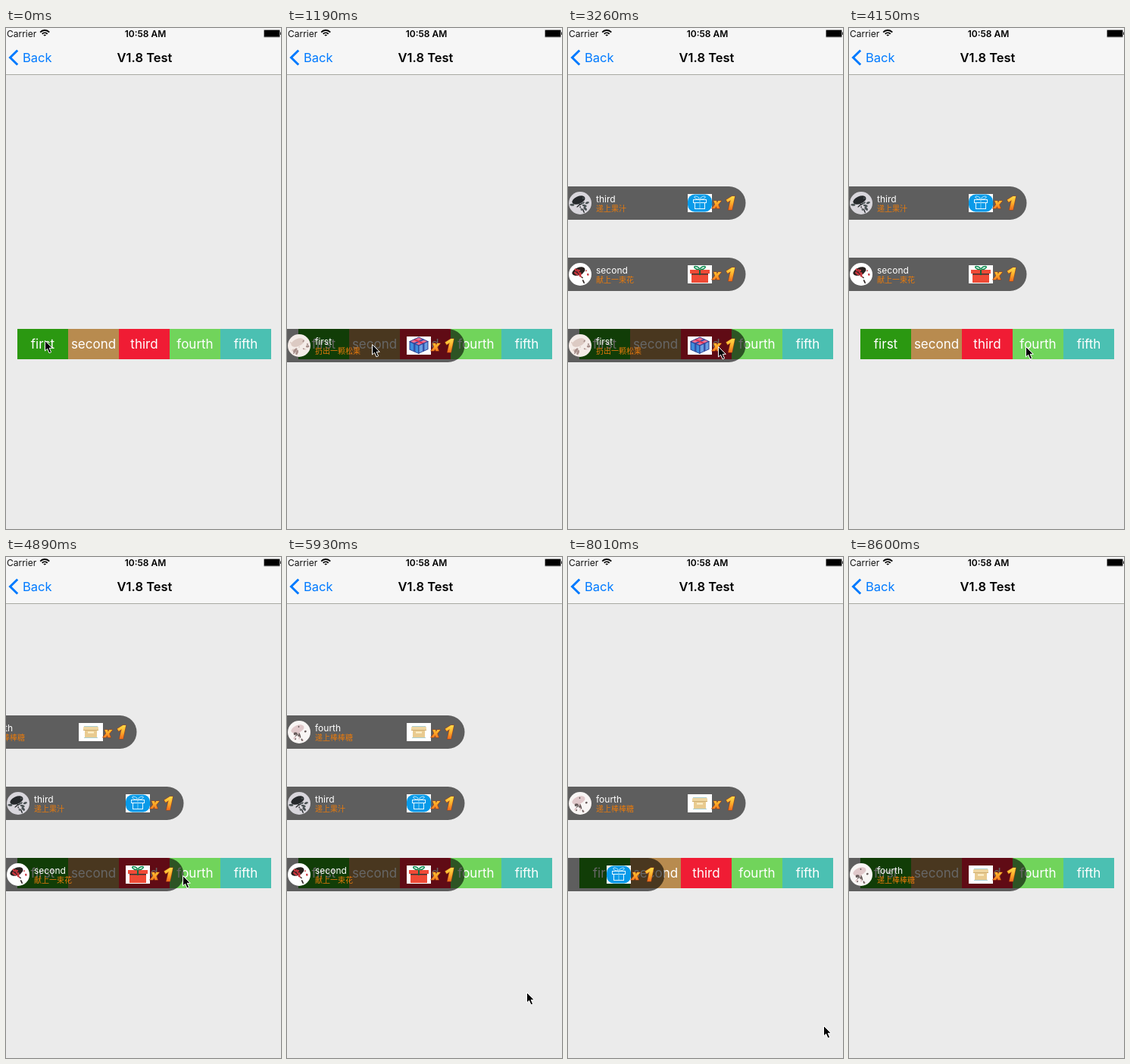
These frames come from a looping animation (363 by 661 pixels, 9270 ms). An HTML page with a canvas:

```html
<!DOCTYPE html>
<html lang="en">
<head>
<meta charset="utf-8">
<title>Gift banners</title>
<style>
html, body { margin: 0; width: 100%; height: 100%; overflow: hidden; background: #ebebeb; }
canvas { display: block; width: 363px; height: 661px; }
</style>
</head>
<body>
<canvas id="stage"></canvas>
<script>
const W = 363, H = 661, LOOP = 9270, STEP = 148.2;
const BAR = 397, ROW = 94, WIDE = 234.5, TALL = 44;
const SLIDE = 400, FALL = 300, PAUSE = 10;
const SANS = 'Inter, "Noto Sans CJK SC", "Noto Sans CJK", sans-serif';
const canvas = document.getElementById('stage');
const c = canvas.getContext('2d');
const dpr = window.devicePixelRatio || 1;
canvas.width = W * dpr;
canvas.height = H * dpr;
c.scale(dpr, dpr);

const buttons = [
  ['first', '#2b9811'], ['second', '#b88b4f'], ['third', '#f01c34'],
  ['fourth', '#71d45b'], ['fifth', '#4bc0b2']
];
const banners = [
  { name: 'first', note: '扔出一颗松果', lane: 0, enter: 690, leave: 3750,
    face: ['#f4ece8', '#dccac3', '#a8908c'], gift: cube },
  { name: 'second', note: '献上一束花', lane: 1, enter: 1880, leave: 5955,
    face: ['#ffffff', '#29211f', '#c9343c'], gift: redBox },
  { name: 'third', note: '递上果汁', lane: 2, enter: 2760, leave: 7815,
    face: ['#d8d6dc', '#25282b', '#4a5254'], gift: badge },
  { name: 'fourth', note: '递上棒棒糖', lane: 2, enter: 4625, leave: Infinity,
    face: ['#f8f5f4', '#e0c8ca', '#665a59'], gift: crate }
];
const falls = banners.map(b => b.leave + SLIDE + PAUSE);
const hops = [
  { at: 800, dur: 380, x: 112, y: 417 },
  { at: 1900, dur: 430, x: 177, y: 420 },
  { at: 3050, dur: 500, x: 233, y: 420 },
  { at: 5400, dur: 900, x: 365, y: 665 },
  { at: 7330, dur: 470, x: 337, y: 618 },
  { at: 8080, dur: 320, x: 365, y: 665 }
];

const ease = (t, start, dur) => {
  const p = Math.min(1, Math.max(0, (t - start) / dur));
  return p * p * (3 - 2 * p);
};

function seeded(seed) {
  return () => (seed = seed * 16807 % 2147483647) / 2147483647;
}

function rect(color, x, y, w, h) {
  c.fillStyle = color;
  c.fillRect(x, y, w, h);
}

function rounded(color, x, y, w, h, r) {
  c.beginPath();
  c.roundRect(x, y, w, h, r);
  c.fillStyle = color;
  c.fill();
}

function oval(color, x, y, rx, ry = rx, turn = 0) {
  c.beginPath();
  c.ellipse(x, y, rx, ry, turn, 0, Math.PI * 2);
  c.fillStyle = color;
  c.fill();
}

function line(color, width, ...points) {
  c.beginPath();
  for (let i = 0; i < points.length; i += 2) c.lineTo(points[i], points[i + 1]);
  c.strokeStyle = color;
  c.lineWidth = width;
  c.stroke();
}

function text(str, x, y, size, color, weight = 400, align = 'left') {
  c.font = `${weight} ${size}px ${SANS}`;
  c.textAlign = align;
  c.fillStyle = color;
  c.fillText(str, x, y);
}

// A round portrait reduced to soft dabs of its main tones
function portrait([back, main, detail], seed) {
  const rnd = seeded(seed * 7919);
  c.save();
  c.beginPath();
  c.arc(16, 22, 15, 0, Math.PI * 2);
  c.clip();
  rect(back, 0, 6, 32, 32);
  oval(main, 14, 18, 9, 5, -0.4);
  for (let i = 0; i < 14; i++) {
    const a = rnd() * Math.PI * 2, r = 12 * rnd();
    oval(i % 3 ? detail : main, 16 + r * Math.cos(a), 24 + r * Math.sin(a) * 0.8,
      1 + 2.5 * rnd(), 0.6 + rnd(), a);
  }
  c.restore();
}

function bow(color, y, width) {
  c.strokeStyle = color;
  c.lineWidth = width;
  for (const side of [-1, 1]) {
    c.beginPath();
    c.ellipse(174 + side * 4, y, 3.5, 1.6, side * -0.4, 0, Math.PI * 2);
    c.stroke();
  }
}

function cube() {
  const faces = [
    ['#ef6f91', 1, 0.45, -1, 0.45, 11], ['#3d8ddd', 1, 0.45, 0, 0.85, 17],
    ['#6b9fe2', 1, -0.45, 0, 0.85, 22]
  ];
  faces.forEach(([color, ax, ay, bx, by, y], i) => {
    c.save();
    c.transform(ax, ay, bx, by, i === 1 ? 162 : 174, y);
    rect(color, 0, 0, 12, 12);
    rect('#3450a8', 5, 0, 2.5, 12);
    if (!i) rect('#d9344f', 0, 5, 12, 2.5);
    c.strokeStyle = '#293a8e';
    c.lineWidth = 1;
    c.strokeRect(0, 0, 12, 12);
    c.restore();
  });
}

function redBox() {
  rect('#f04a36', 161, 16, 26, 5);
  rect('#f04a36', 163, 22, 22, 11);
  rect('#3b3434', 163, 21, 22, 1.5);
  rect('#14663f', 173, 16, 2, 7);
  bow('#0b8c50', 13.5, 1.5);
}

function badge() {
  rounded('#089be9', 158, 10.5, 32, 23, 9);
  c.strokeStyle = '#e8f8ff';
  c.lineWidth = 1;
  c.strokeRect(165.5, 17.5, 17, 4);
  c.strokeRect(167.5, 21.5, 13, 8);
  line('#7fcdf5', 1, 174, 18, 174, 29);
  bow('#e8f8ff', 15, 0.8);
}

function crate() {
  rounded('#efd6a0', 164, 14, 20, 6, [3, 3, 0, 0]);
  rect('#e9cb90', 166, 20, 16, 9);
  line('#cfae72', 1, 164, 19.5, 184, 19.5);
  rect('#fff3d0', 170, 21.5, 8, 2);
  for (const y of [14.5, 29.5]) line('#a9d0d4', 1, 165, y, 183, y);
}

function count() {
  const fill = c.createLinearGradient(0, 12, 0, 32);
  ['#ffe04a', '#ffb02b', '#f0641c'].forEach((color, i) => fill.addColorStop(i / 2, color));
  c.textAlign = 'left';
  c.lineJoin = 'round';
  c.strokeStyle = '#a64412';
  c.lineWidth = 1.2;
  for (const [str, x, y, size] of [['x', 191, 29, 18], ['1', 207, 31, 25]]) {
    c.font = `italic 800 ${size}px "Open Sans", sans-serif`;
    c.strokeText(str, x, y);
    c.fillStyle = fill;
    c.fillText(str, x, y);
  }
}

function drawBanner(b, i, t) {
  const x = 235 * (ease(t, b.enter, SLIDE) - 1 - ease(t, b.leave, SLIDE));
  if (x <= -235) return;
  const lane = falls.reduce((n, f) => f > b.enter ? n - ease(t, f, FALL) : n, b.lane);
  c.save();
  c.translate(Math.round(x), Math.round(BAR - ROW * lane));
  rounded('rgba(0,0,0,.6)', 0, 0, WIDE, TALL, [0, TALL / 2, TALL / 2, 0]);
  portrait(b.face, i + 1);
  text(b.name, 37, 21, 12, '#fff');
  text(b.note, 37, 33, 10, '#e87a0c');
  rect('#fff', 158, 10, 32, 24);
  b.gift();
  count();
  c.restore();
}

function drawHeader() {
  rect('#f6f6f6', 0, 0, W, 61);
  rect('#a9aaa3', 0, 61, W, 1);
  text('Carrier', 1, 11.5, 12, '#111');
  text('10:58 AM', 184, 11.5, 12, '#000', 600, 'center');
  for (const r of [1.5, 4.6, 8]) {
    c.beginPath();
    c.arc(51.2, 11, r, -Math.PI * 0.77, -Math.PI * 0.23);
    c.strokeStyle = '#000';
    c.lineWidth = 1.8;
    c.stroke();
  }
  rounded('#999', 340, 2, 22, 10.5, 1.5);
  rect('#000', 341, 3, 20, 8.5);
  rect('#333', 362, 5.5, 1, 3.5);
  line('#007aff', 3, 15.2, 29.5, 5.5, 39, 15.2, 48.5);
  text('Back', 22, 45, 16.5, '#007aff');
  text('V1.8 Test', 183, 45, 16.5, '#000', 600, 'center');
}

function drawPointer(t) {
  let x = 51, y = 412;
  for (const hop of hops) {
    const p = ease(t, hop.at, hop.dur);
    x += (hop.x - x) * p;
    y += (hop.y - y) * p;
  }
  c.save();
  c.translate(Math.round(x), Math.round(y));
  const arrow = new Path2D('M.5 .5V14L3.6 11.2 6 16.8 8.6 15.7 6.2 10.3H10.3Z');
  c.fillStyle = '#000';
  c.fill(arrow);
  c.strokeStyle = '#fff';
  c.lineWidth = 1;
  c.stroke(arrow);
  c.restore();
}

function draw(now) {
  // The picture advances in coarse steps
  const t = Math.floor((now % LOOP + 10) / STEP) * STEP;
  c.lineJoin = 'miter';
  rect('#ebebeb', 0, 0, W, H);
  drawHeader();
  buttons.forEach(([label, color], i) => {
    rect(color, 15 + i * 67, BAR, 67, 40);
    text(label, 48.5 + i * 67, 423, 17, '#fff', 400, 'center');
  });
  banners.forEach((b, i) => drawBanner(b, i, t));
  drawPointer(t);
}

let start;
function tick(now) {
  start ??= now;
  draw(now - start);
  requestAnimationFrame(tick);
}
draw(0);
requestAnimationFrame(tick);
</script>
</body>
</html>
```
